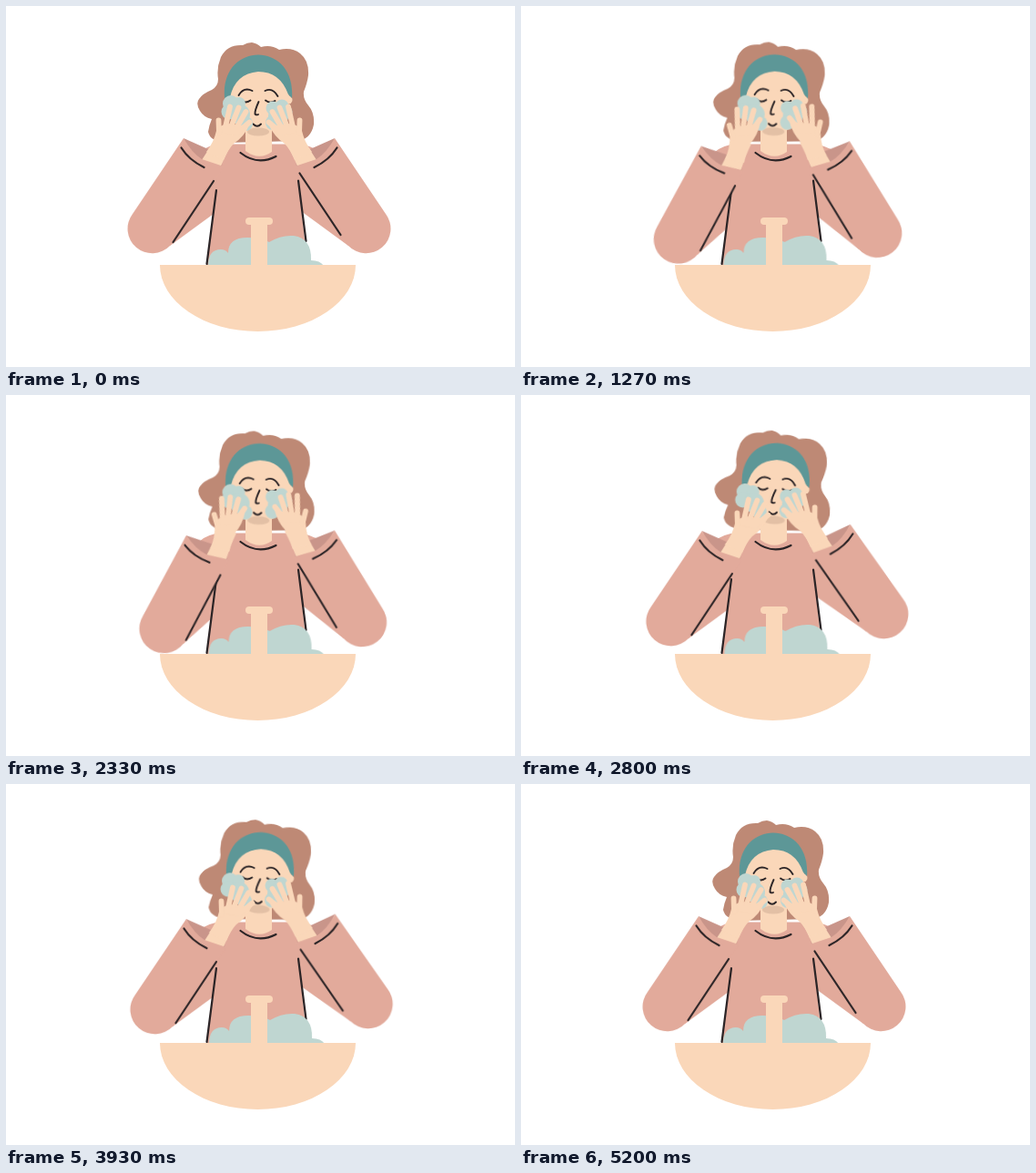
An HTML page without scripts that plays this animation: 559 px wide and 396 px high, repeating every 5.23 s.

```html
<!DOCTYPE html>
<html lang="en">
<head>
<meta charset="utf-8">
<title>Face wash</title>
<style>
  html, body { margin: 0; width: 100%; height: 100%; overflow: hidden; background: #fff; }
  svg { display: block; width: 559px; height: 396px; }

  .skin { fill: #fad7b9; }
  .pink { fill: #e2aa9b; }
  .inner { fill: #c9958a; }
  .hair { fill: #be8975; }
  .band { fill: #5d9797; }
  .foam { fill: #bfd6d1; }
  .shade { fill: #e3c0a5; }
  .line { fill: none; stroke: #2b2426; stroke-width: 2.2; stroke-linecap: round; }
  .thin { stroke-width: 1.9; }
  .fingers { fill: none; stroke: #fad7b9; stroke-width: 5.8; stroke-linecap: round; }

  /* one wash stroke; five fill 5230 ms */
  .head, .left, .right, .hand, .suds, .cheek {
    animation: 1046ms infinite cubic-bezier(.42, 0, .58, 1);
  }
  .head { animation-name: tilt; transform-origin: 276px 150px; }
  .left { animation-name: left; transform-origin: 288px 120px; }
  .right { animation-name: right; transform-origin: 278px 146px; }
  .hand { animation-name: hand; transform-origin: 230px 160px; }
  .suds { animation-name: suds; }
  .cheek { animation-name: cheek; }

  @keyframes tilt {
    0% { transform: translate(0, 0) rotate(0deg); animation-timing-function: cubic-bezier(.3, 0, .5, 1); }
    61% { transform: translate(0, -1px) rotate(3.1deg); }
    100% { transform: translate(0, 0) rotate(0deg); }
  }
  @keyframes left {
    0% { transform: translate(0, 0) rotate(0deg); animation-timing-function: cubic-bezier(.3, .3, .6, 1); }
    38% { transform: translate(0, 0) rotate(-7.3deg); }
    62% { transform: translate(4px, 4.3px) rotate(0deg); }
    100% { transform: translate(0, 0) rotate(0deg); }
  }
  @keyframes right {
    0% { transform: translate(0, 0) rotate(0deg); animation-timing-function: cubic-bezier(.3, .3, .6, 1); }
    38% { transform: translate(0, 0) rotate(3.2deg); }
    62% { transform: translate(.7px, -1.2px) rotate(-1.4deg); }
    100% { transform: translate(0, 0) rotate(0deg); }
  }
  @keyframes hand {
    0% { transform: rotate(0deg); animation-timing-function: cubic-bezier(.3, .3, .6, 1); }
    38% { transform: rotate(-12deg); }
    62%, 100% { transform: rotate(0deg); }
  }
  @keyframes suds {
    0%, 100% { transform: none; }
    58% { transform: translate(1.6px, 0); }
  }
  @keyframes cheek {
    0%, 100% { transform: none; }
    58% { transform: translate(-1.5px, -1px); }
  }
</style>
</head>
<body>
<svg viewBox="0 0 559 396" xmlns="http://www.w3.org/2000/svg">
  <defs>
    <path id="upper" class="pink" d="M160 240 L215 162 L250 168 V206 L232 225 L180 263 Z"/>
    <g id="cuff">
      <path class="inner" d="M195 145 L222 157 L238 163 L237 177 L206 172 Z"/>
      <path class="skin" d="M213 172 L231 144 L250 148 Q242 161 235 178 Z"/>
    </g>
    <g id="palm">
      <path class="skin" d="M231 137 Q236 130 243 129 L258 131 L268 129 Q262 143 250 151 Q244 157 239 169 L220 160 Q228 150 231 137 Z"/>
      <path class="fingers" d="M234 140 L233.500 125.500 M240 137 L246 110.500 M245 138 L255.500 111.500 M250 139 L263.500 116 M254 139 L267.500 127.500"/>
    </g>
    <g id="sleeve">
      <path class="pink" d="M195 145 L139 228 A27 27 0 0 0 180 263 L183.500 259 L228 192 L239 176 L215 168 Q204 161 195 145 Z"/>
      <path class="line" d="M192.500 155.500 Q201 169 217.500 177"/>
    </g>
  </defs>

  <g class="head">
    <path class="hair" d="M270 40 Q276 41 280 45 Q291 42 300 48 Q314 45 323 52 Q333 60 332 76 Q331 84 327 94 Q326 102 332 109 Q339 117 338 130 Q335 146 320 148 L240 150 Q224 148 222 138 Q223 131 226 124 Q217 122 213 115 Q208 107 212 102 Q216 96 226 92 Q233 88 233 80 Q231 68 236 56 Q243 42 260 43 Q265 40 270 40 Z"/>
  </g>

  <g class="left"><use href="#upper"/></g>
  <g class="right"><use href="#upper" transform="translate(556 0) scale(-1 1)"/></g>

  <path class="pink" d="M212 161 Q222 151.500 238 151.500 H318 Q334 151.500 346 161 L321 191 L331 284 H220 L231 202 Z"/>
  <path class="skin" d="M263 130 H292 V160 Q278 170 263 159 Z"/>
  <path class="line" d="M257.500 161 Q276 175.500 296.500 165"/>
  <path class="line" d="M231 202 L220.500 283 M321 191.500 L329.500 258"/>

  <g class="head">
    <circle class="skin" cx="310" cy="103" r="4.500"/>
    <path class="skin" d="M242 98 C242 60 312 60 311 98 C311 124 296 140 277 140 C257 140 243 124 242 98 Z"/>
    <ellipse class="shade" cx="277" cy="138" rx="12" ry="4.500"/>
    <path class="band" d="M240 101 C235 37.500 319 37.500 314 101 L310 97 Q301 72 277 72 Q252 74 246 100 Z"/>
    <path class="line thin" d="M255.500 98 Q261 88.500 270.500 93 M284.500 93 Q293 89 298.500 99 M258 103.500 Q263 107.500 268.500 103.500 M285 103.500 Q290 107.500 295.500 104 M277.500 105 Q273 115 273.500 118.500 Q275 120 277 119 M271.500 129.500 Q276 134 280 129.500"/>
  </g>

  <g class="foam cheek">
    <circle cx="247" cy="107" r="9"/>
    <circle cx="256" cy="107" r="7"/>
    <circle cx="245" cy="116" r="8.500"/>
    <circle cx="257" cy="119" r="11"/>
    <circle cx="263" cy="129" r="8"/>
    <circle cx="293" cy="112" r="7.500"/>
    <circle cx="303" cy="110" r="7.500"/>
    <circle cx="307" cy="116" r="7.500"/>
    <circle cx="299" cy="121" r="11"/>
    <circle cx="293" cy="128" r="8"/>
  </g>

  <g class="left">
    <use href="#cuff"/>
    <g class="hand"><use href="#palm"/></g>
    <use href="#sleeve"/>
    <path class="line" d="M228 192 L183.500 259"/>
  </g>
  <g class="right">
    <g transform="translate(556 0) scale(-1 1)">
      <use href="#cuff"/>
      <g class="hand"><use href="#palm"/></g>
      <use href="#sleeve"/>
    </g>
    <path class="line" d="M322.500 183.500 L367.500 251"/>
  </g>

  <g class="foam suds">
    <path d="M222 285 Q222 267 236 267 Q241 267 244 271 Q244 254 265 254 Q280 254 289 259 Q302 251 316 252 Q336 255 335 279 Q345 279 349 285 Z"/>
  </g>

  <g class="skin">
    <rect x="263" y="232" width="30" height="8" rx="4"/>
    <rect x="269" y="236" width="18" height="50"/>
    <path d="M169 284 H384 A107.500 73 0 0 1 169 284 Z"/>
  </g>
</svg>
</body>
</html>
```
